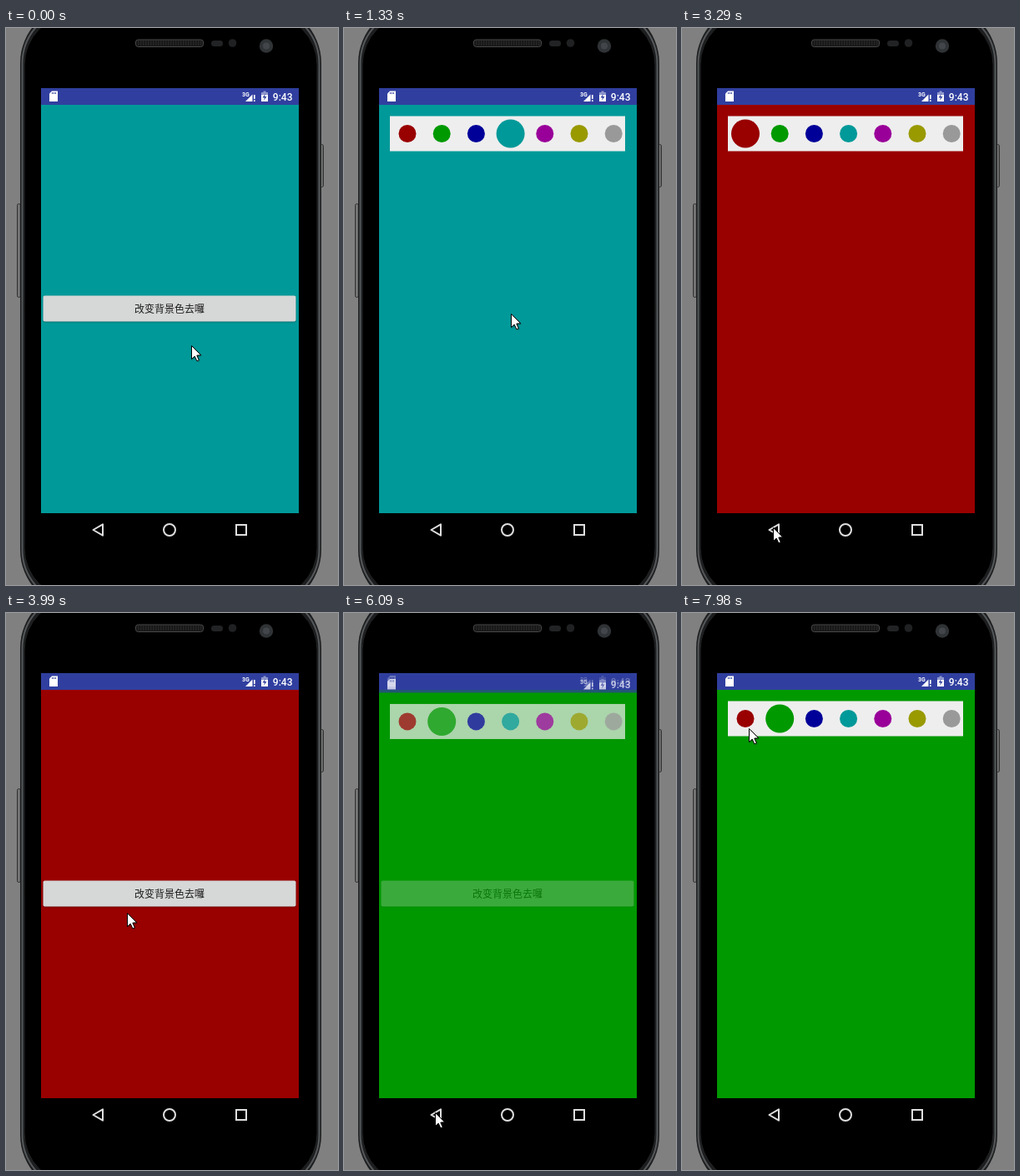
An HTML page with a canvas for the animation above (8 s loop, 398 by 667 pixels).

```html
<!DOCTYPE html>
<html>
<head>
<meta charset="utf-8">
<style>
html, body { margin: 0; height: 100%; overflow: hidden; background: #808080; }
canvas { display: block; }
</style>
</head>
<body>
<canvas id="stage" width="398" height="667"></canvas>
<script>
const ctx = document.getElementById('stage').getContext('2d');
const LOOP = 8000, STEP = 70;

// each palette entry is a bit mask: 1 red, 2 green, 4 blue
const PALETTE = [1, 2, 4, 6, 5, 3, 7].map(mask => [1, 2, 4].map(bit => mask & bit ? 153 : 0));
const FIRST = 3;
const VISITS = [
  { press: 800, pick: 2450, dot: 0, close: 3400 },
  { press: 4220, pick: 5250, dot: 1, close: 6020 },
  { press: 7180, pick: Infinity, dot: 0, close: Infinity }
];
const OPEN_DELAY = 260, SHRINK = 110, GROW = 250, LEAVE = 250;
const SMALL = 10.5, BIG = 17;

// pointer moves: start, end, x, y
const HOME = [222, 380], BACK = [109, 598];
const MOVES = [
  [175, 700, 200, 342], [1500, 2030, 75, 118], [2700, 3220, ...BACK],
  [3450, 3990, 145, 359], [3990, 4200, 150, 338], [4620, 5180, 121, 129],
  [5390, 5740, 118, 638], [5810, 6020, ...BACK], [6180, 6650, 125, 215],
  [6650, 7070, 150, 335], [7600, 7980, 80, 138]
];

const clamp = v => Math.max(0, Math.min(1, v));
const mix = (a, b, p) => a + (b - a) * p;
const progress = (t, start, length) => clamp((t - start) / length);
const easeOut = p => 1 - (1 - p) ** 2.7;
const css = rgb => `rgb(${rgb.map(Math.round)})`;

function rect(x, y, w, h, fill) {
  ctx.fillStyle = fill;
  ctx.fillRect(x, y, w, h);
}

function paint(fill, stroke, width) {
  if (fill) { ctx.fillStyle = fill; ctx.fill(); }
  if (stroke) { ctx.strokeStyle = stroke; ctx.lineWidth = width; ctx.stroke(); }
}

function round(x, y, w, h, r, fill, stroke, width = 1) {
  ctx.beginPath();
  ctx.roundRect(x, y, w, h, r);
  paint(fill, stroke, width);
}

function disc(x, y, r, fill, stroke, width = 1) {
  ctx.beginPath();
  ctx.arc(x, y, r, 0, Math.PI * 2);
  paint(fill, stroke, width);
}

function poly(points, fill, stroke, width = 1) {
  ctx.beginPath();
  points.forEach(([x, y]) => ctx.lineTo(x, y));
  ctx.closePath();
  paint(fill, stroke, width);
}

function text(str, x, y, font, fill, align) {
  ctx.font = font;
  ctx.textAlign = align;
  ctx.fillStyle = fill;
  ctx.fillText(str, x, y);
}

function sideKey(x, y, h) {
  const shade = ctx.createLinearGradient(x, 0, x + 4, 0);
  shade.addColorStop(0, '#3a3a3a');
  shade.addColorStop(.4, '#8a8a8a');
  shade.addColorStop(1, '#444');
  round(x, y, 4, h, 2, shade, '#333');
}

function phone() {
  rect(0, 0, 398, 667, '#808080');
  sideKey(13.5, 210.5, 112);
  sideKey(376.5, 139.5, 51);
  round(17, -28, 361, 723, 70, '#1d1e1f');
  round(19.5, -24, 356, 715, 67, null, '#55585a', 2);
  round(22, -16, 351, 699, 60, '#000', '#242526');
  round(155.5, 14, 81, 8.5, 3, '#161616', '#4a4a4a');
  for (let i = 0; i < 78; i++) rect(158 + i % 26 * 3, 15.5 + (i / 26 | 0) * 2, 1.5, 1, '#363636');
  round(246, 15, 14, 7, 3.5, '#222325');
  disc(271.5, 18, 4.8, '#202123');
  disc(312, 21.5, 8.2, '#303336');
  disc(312, 21.5, 4, '#42464a');
}

function statusBar() {
  const blue = '#303f9f', pale = '#8f98cc';
  rect(42, 72, 309, 20, blue);
  poly([[55, 75.5], [62, 75.5], [62, 88], [52, 88], [52, 78.5]], '#fff');
  for (let x = 55; x < 61; x += 2) rect(x, 77, 1, 2, blue);
  text('3G', 283, 81.5, '700 7px Roboto, sans-serif', '#fff', 'left');
  poly([[287, 88], [295.5, 79.5], [295.5, 88]], '#fff');
  rect(297, 80, 1.6, 5, '#fff');
  rect(297, 86.3, 1.6, 1.7, '#fff');
  rect(308.5, 75.5, 3, 2, pale);
  rect(306, 77, 8, 4, pale);
  rect(306, 80, 8, 8, '#fff');
  poly([[311, 78.5], [307.5, 83.5], [310, 83.5], [309, 87], [312.5, 82], [310, 82]], blue);
  text('9:43', 343.5, 87, '500 12px Roboto, sans-serif', '#fff', 'right');
}

function navBar() {
  const light = '#dedede';
  rect(42, 581, 309, 42, '#000');
  ctx.lineJoin = 'round';
  poly([[104.5, 601], [116, 594.3], [116, 607.7]], null, light, 2);
  ctx.lineJoin = 'miter';
  disc(196, 601, 7, null, light, 2);
  ctx.strokeRect(276, 595, 12, 12);
}

function mainPage(rgb, held) {
  rect(42, 92, 309, 489, css(rgb));
  statusBar();
  ctx.save();
  ctx.shadowColor = 'rgba(0,0,0,.35)';
  ctx.shadowBlur = held > 0 ? 4 : 1.5;
  ctx.shadowOffsetY = .7;
  round(44.5, 320.5, 303, 31, 2, '#d6d7d7');
  ctx.restore();
  if (held > 0) {
    ctx.save();
    ctx.clip();
    rect(44, 320, 304, 32, 'rgba(0,0,0,.02)');
    disc(198, 342, held * .26, 'rgba(0,0,0,.045)');
    ctx.restore();
  }
  text('改变背景色去囉', 196, 341, '12px "Noto Sans CJK SC", "Noto Sans CJK", sans-serif', '#1c1c1c', 'center');
}

// background colour and dot sizes after every pick made so far
function pickerState(t) {
  let rgb = PALETTE[FIRST], current = FIRST;
  const radii = PALETTE.map((_, i) => i === FIRST ? BIG : SMALL);
  for (const { pick, dot } of VISITS) {
    if (t < pick) break;
    const p = progress(t, pick + SHRINK, GROW);
    rgb = rgb.map((v, i) => mix(v, PALETTE[dot][i], p));
    radii[current] = mix(BIG, SMALL, p);
    radii[dot] = p ? BIG * p : SMALL * (1 - progress(t, pick, SHRINK));
    current = dot;
  }
  return { rgb, radii };
}

function pickerPage({ rgb, radii }) {
  rect(42, 92, 309, 489, css(rgb));
  statusBar();
  rect(55, 105.5, 282, 42, '#eee');
  radii.forEach((r, i) => disc(76 + i * 41.2, 126.5, r, css(PALETTE[i])));
}

function screen(t) {
  const visit = VISITS.find(v => t >= v.press && t < v.close + LEAVE);
  const state = pickerState(t);
  const closed = VISITS.filter(v => t >= v.close).pop();
  const open = visit && visit.press + OPEN_DELAY;
  ctx.save();
  ctx.beginPath();
  ctx.rect(42, 72, 309, 551);
  ctx.clip();
  mainPage(PALETTE[closed ? closed.dot : FIRST], visit && t < visit.close ? t - visit.press : 0);
  if (t >= open) {
    const leave = progress(t, visit.close, LEAVE);
    ctx.globalAlpha = progress(t, open, 200) * (1 - leave);
    ctx.translate(0, 44 * ((1 - progress(t, open, 350)) ** 5 + leave ** 2));
    pickerPage(state);
  }
  ctx.restore();
  navBar();
}

function pointer(t) {
  let [x, y] = HOME;
  for (const [start, end, toX, toY] of MOVES) {
    const p = easeOut(progress(t, start, end - start));
    x = mix(x, toX, p);
    y = mix(y, toY, p);
  }
  ctx.save();
  ctx.translate(Math.round(x) + .5, Math.round(y) + .5);
  ctx.shadowColor = 'rgba(0,0,0,.35)';
  ctx.shadowBlur = 2;
  ctx.shadowOffsetX = ctx.shadowOffsetY = 1;
  poly([[0, 0], [0, 16], [3.7, 12.6], [6.4, 18.3], [8.8, 17.2], [6.3, 11.6], [11.3, 11.3]], '#fff');
  ctx.shadowColor = 'transparent';
  paint(null, '#000', 1);
  ctx.restore();
}

function frame(now) {
  const t = Math.floor(now % LOOP / STEP) * STEP;
  phone();
  screen(t);
  pointer(t);
  requestAnimationFrame(frame);
}
requestAnimationFrame(frame);
</script>
</body>
</html>
```
